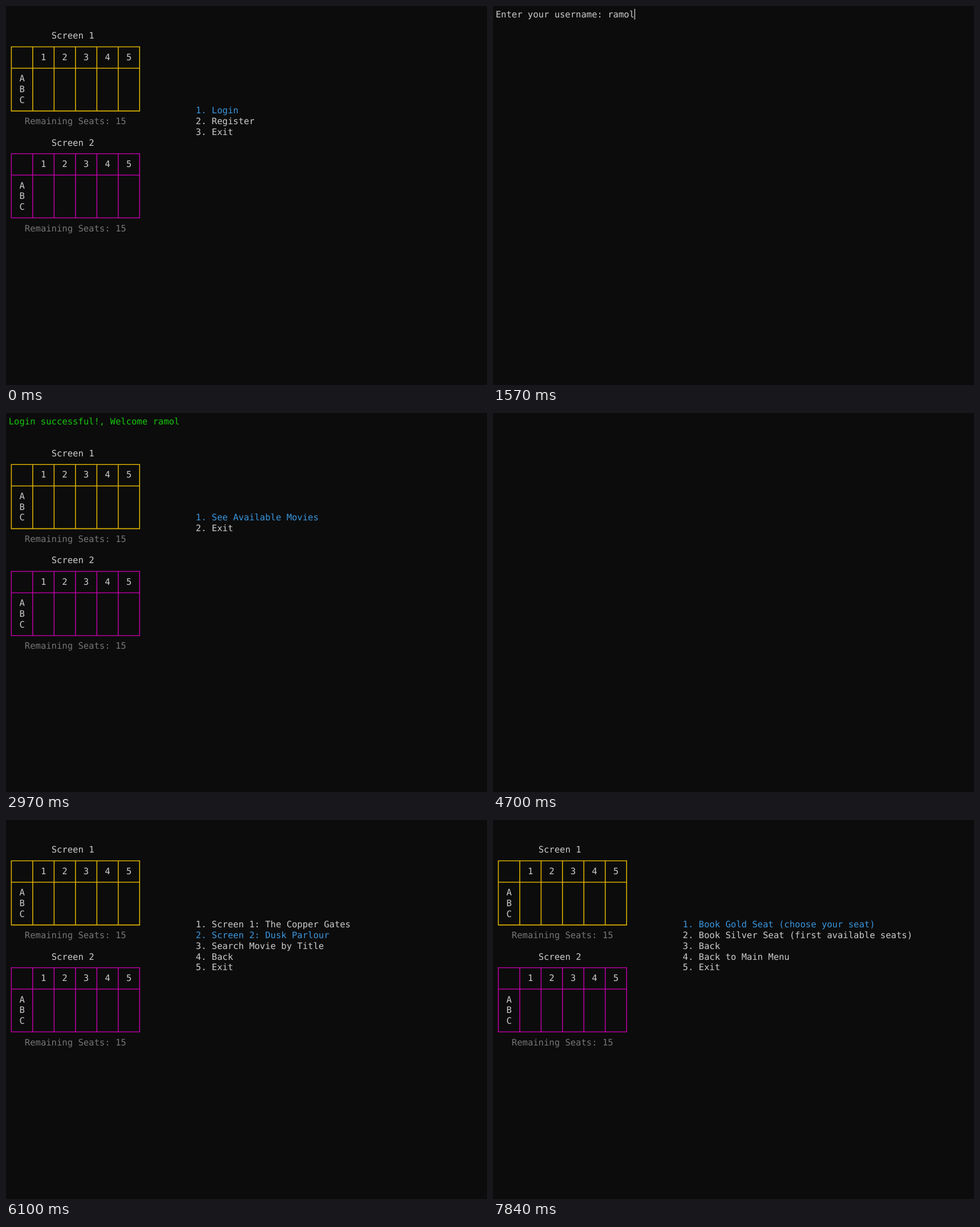
An HTML page that plays this animation: 843 px wide and 664 px high, repeating every 8000 ms.

```html
<!DOCTYPE html>
<html lang="en">
<head>
<meta charset="utf-8">
<title>Cinema booking terminal</title>
<style>
  html, body { margin: 0; width: 100%; height: 100%; overflow: hidden; background: #0c0c0c; }
  svg { display: block; width: 100%; height: 100%; }
  text {
    font: 15.56px "DejaVu Sans Mono", monospace;
    text-rendering: geometricPrecision;
    white-space: pre;
  }
  path { fill: none; stroke-width: 1.6; }
</style>
</head>
<body>
<svg id="stage" viewBox="0 0 843 664"></svg>
<script>
const LOOP = 8000;
const CELL = { w: 9.367, h: 18.735, left: 4.7, top: 5, baseline: 14.8 };
const COLOR = {
  text: "#cccccc", dim: "#767676", active: "#3a96dd", success: "#16c60c",
  gold: "#d7af00", magenta: "#b4009e", cursor: "#ffffff"
};
const USER = "ramol";
const stage = document.getElementById("stage");

const colX = col => CELL.left + col * CELL.w;
const rowY = row => CELL.top + row * CELL.h;

function add(tag, attrs, content = "") {
  const node = document.createElementNS("http://www.w3.org/2000/svg", tag);
  for (const key in attrs) node.setAttribute(key, attrs[key]);
  node.textContent = content;
  stage.append(node);
}

function print(col, row, content, fill = COLOR.text) {
  add("text", { x: colX(col), y: rowY(row) + CELL.baseline, fill }, content);
}

function drawSeats(number, row, stroke) {
  const lineY = offset => rowY(row + offset + 0.5) + 0.9;
  const left = colX(0.5), right = colX(24.5);
  let d = "";
  for (const offset of [1, 3, 7]) d += `M${left - 0.8} ${lineY(offset)}H${right + 0.8}`;
  for (let i = 0; i <= 6; i++) d += `M${colX(4 * i + 0.5)} ${lineY(1)}V${lineY(7)}`;
  add("path", { d, stroke });

  print(8, row, `Screen ${number}`);
  for (let i = 1; i <= 5; i++) print(2 + 4 * i, row + 2, String(i));
  [..."ABC"].forEach((letter, i) => print(2, row + 4 + i, letter));
  print(3, row + 8, "Remaining Seats: 15", COLOR.dim);
}

function menu(items, selected = 0, message = "") {
  return () => {
    const row = message ? 3 : 2;
    if (message) print(0, 0, message, COLOR.success);
    drawSeats(1, row, COLOR.gold);
    drawSeats(2, row + 10, COLOR.magenta);
    items.forEach((item, i) =>
      print(35, 9 + i, `${i + 1}. ${item}`, i === selected ? COLOR.active : COLOR.text));
  };
}

function form(userLength, passwordLength) {
  return () => {
    const lines = ["Enter your username: " + USER.slice(0, userLength)];
    if (passwordLength !== undefined)
      lines.push("Enter your password: " + "*".repeat(passwordLength));
    lines.forEach((line, row) => print(0, row, line));
    const row = lines.length - 1;
    add("rect", {
      x: Math.floor(colX(lines[row].length)), y: rowY(row),
      width: 1, height: CELL.h, fill: COLOR.cursor
    });
  };
}

const movies = [
  "Screen 1: The Copper Gates", "Screen 2: Dusk Parlour",
  "Search Movie by Title", "Back", "Exit"
];
const booking = [
  "Book Gold Seat (choose your seat)", "Book Silver Seat (first available seats)",
  "Back", "Back to Main Menu", "Exit"
];

const steps = [
  [0, menu(["Login", "Register", "Exit"])],
  [500, form(0)],
  [980, form(1)],
  [1110, form(2)],
  [1370, form(3)],
  [1470, form(4)],
  [1570, form(5)],
  [1890, form(5, 0)],
  [2230, form(5, 1)],
  [2290, form(5, 2)],
  [2500, form(5, 4)],
  [2700, form(5, 5)],
  [2970, menu(["See Available Movies", "Exit"], 0, `Login successful!, Welcome ${USER}`)],
  [4700, () => {}],
  [4760, menu(movies)],
  [6100, menu(movies, 1)],
  [6780, menu(movies)],
  [7840, menu(booking)]
];

let shown = null;
const start = performance.now();

function tick() {
  const time = (performance.now() - start) % LOOP;
  const step = steps.findLast(([at]) => at <= time);
  if (step !== shown) {
    shown = step;
    stage.replaceChildren();
    step[1]();
  }
  requestAnimationFrame(tick);
}
tick();
</script>
</body>
</html>
```
